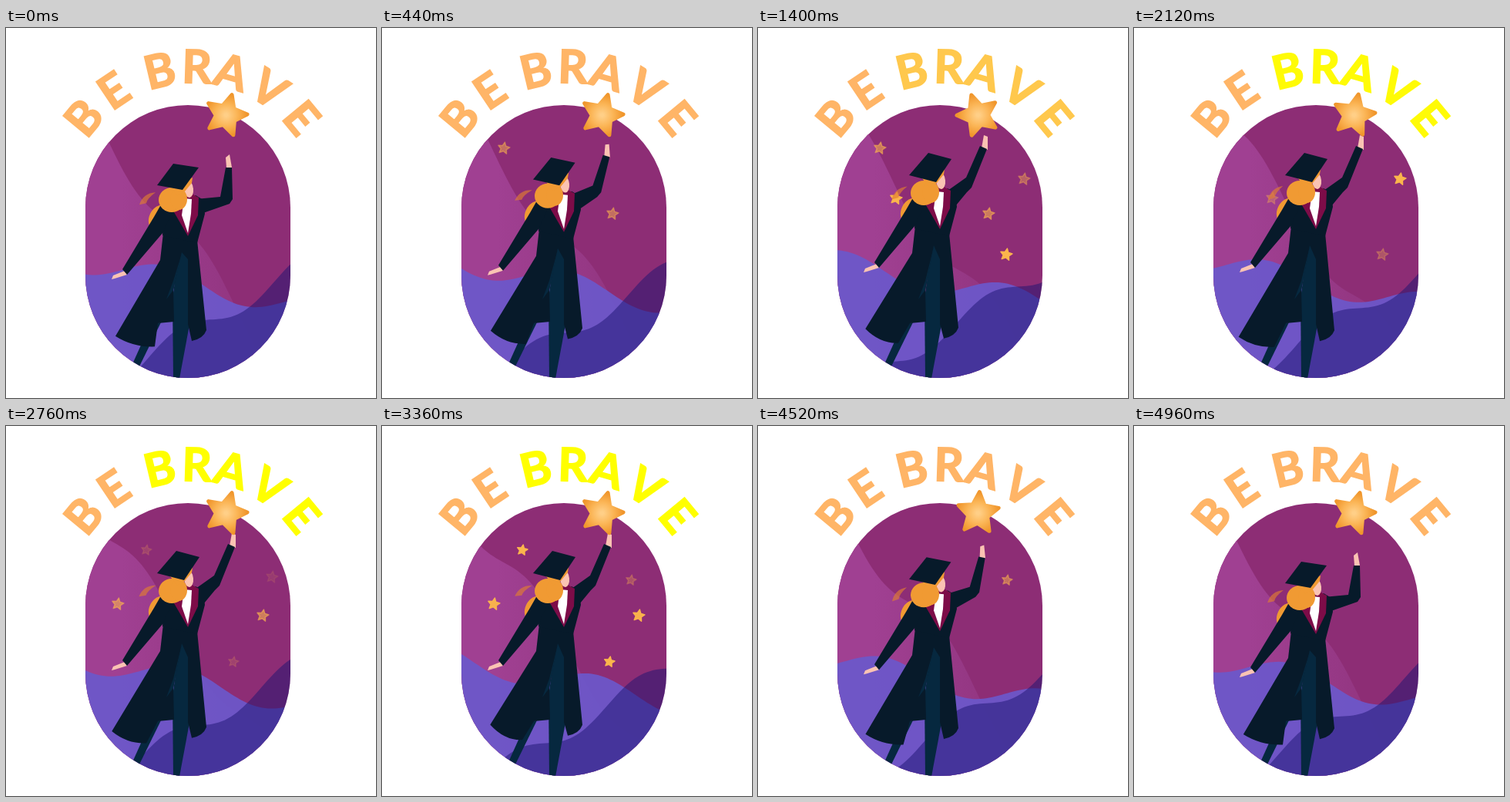
Write an HTML page with a canvas that moves like this. It is 480x480 px and loops after 5000 ms.

```html
<!DOCTYPE html>
<html lang="en">
<head>
<meta charset="utf-8">
<title>Be brave</title>
<style>
html, body { margin: 0; width: 100%; height: 100%; overflow: hidden; background: #fff; }
canvas { display: block; }
</style>
</head>
<body>
<canvas id="stage" width="480" height="480"></canvas>
<script>
const ctx = document.getElementById('stage').getContext('2d');
const LOOP = 5000, CYCLE = LOOP / 2;
const COAT = '#071a2a', TROUSERS = '#06283f', SKIN = '#fac3b3', HAIR = '#f09a33', LAPEL = '#7d0c48';

const clamp = v => Math.max(0, Math.min(1, v));
const lerp = (a, b, k) => a + (b - a) * k;
const ramp = (t, from, to) => clamp((t - from) / (to - from));
const ease = k => k * k * (3 - 2 * k);
const turn = k => Math.cos(k * 2 * Math.PI);
const shift = (pts, dy) => pts.map((v, i) => i % 2 ? v + dy : v);

function poly(color, pts) {
  ctx.fillStyle = color;
  ctx.beginPath();
  for (let i = 0; i < pts.length; i += 2) ctx.lineTo(pts[i], pts[i + 1]);
  ctx.fill();
}

function ellipse(color, x, y, rx, ry, tilt = 0) {
  ctx.fillStyle = color;
  ctx.beginPath();
  ctx.ellipse(x, y, rx, ry, tilt, 0, 7);
  ctx.fill();
}

// Fills everything below the crest.
function wave(color, crest) {
  const pts = [372, 480, 100, 480];
  for (let x = 100; x <= 372; x += 4) pts.push(x, crest(x));
  poly(color, pts);
}

function star(x, y, r, degrees, fill, round) {
  ctx.save();
  ctx.translate(x, y);
  ctx.rotate(degrees * Math.PI / 180);
  ctx.beginPath();
  for (let i = 0; i < 10; i++) {
    const a = i * Math.PI / 5, d = i % 2 ? r * 0.48 : r;
    ctx.lineTo(d * Math.sin(a), -d * Math.cos(a));
  }
  ctx.closePath();
  ctx.fillStyle = ctx.strokeStyle = fill;
  ctx.lineWidth = round;
  ctx.lineJoin = 'round';
  ctx.fill();
  ctx.stroke();
  ctx.restore();
}

// x, y, time of full brightness
const twinkles = [
  [158, 156, 950], [299, 241, 950],
  [179, 221, 1480], [322, 294, 1480], [345, 196, 1980],
  [145, 231, 3200], [333, 246, 3200],
  [182, 161, 3500], [295, 306, 3500], [323, 200, 4020]
];

function drawTwinkles(t) {
  for (const [x, y, peak] of twinkles) {
    ctx.globalAlpha = clamp(1.2 * (1 - Math.abs(t - peak) / 850));
    star(x, y, peak > 3400 ? 7 : 8, 10, '#fbb54c', 1.5);
  }
  ctx.globalAlpha = 1;
}

function drawGown(drop, low, sway) {
  const hemX = 138 + 6 * low - 2.5 * sway, hemY = 394 + 7 * sway;
  const innerX = 182 + 11 * low, innerY = 410.5 + 3.5 * sway;
  const right = 390 + 2.5 * sway;
  ctx.fillStyle = COAT;
  ctx.beginPath();
  ctx.moveTo(205, 248 + drop);
  ctx.lineTo(200, 292 + drop);
  ctx.lineTo(hemX, hemY);
  ctx.quadraticCurveTo(lerp(hemX, innerX, 0.45), innerY + 1, innerX, innerY);
  ctx.lineTo(197, 383);
  ctx.lineTo(218, 381);
  ctx.lineTo(217, 340);
  ctx.lineTo(228, 282 + drop);
  ctx.lineTo(236, 300);
  ctx.lineTo(236, 384);
  ctx.lineTo(241, right + 14);
  ctx.quadraticCurveTo(256, right + 11, 260, right);
  ctx.lineTo(248, 266 + drop);
  ctx.fill();
  poly(TROUSERS, [228, 284 + drop, 217, 328, 208, 352, 217, 340]);
}

function drawTassel(t, y) {
  ctx.save();
  ctx.translate(184, y);
  ctx.rotate(0.12 * Math.sin(t / CYCLE * 2 * Math.PI));
  ctx.fillStyle = 'rgba(225,125,50,.65)';
  ctx.beginPath();
  ctx.moveTo(-11, 8);
  ctx.quadraticCurveTo(-6, -7, 10, -8);
  ctx.quadraticCurveTo(-1, 0, -2, 6);
  ctx.fill();
  ctx.restore();
}

function drawFigure(t) {
  const raise = ease(ramp(t, 0, 800)) * (1 - ease(ramp(t, 3960, 4960)));
  const low = 1 - raise, drop = 9 * low, headDrop = 11 * low;
  const pose = (down, up) => down.map((v, i) => lerp(v, up[i], raise));
  const body = (color, pts) => poly(color, shift(pts, drop));

  // Legs
  poly(TROUSERS, [187, 385, 201, 382, 173, 439, 164, 436]);
  poly(TROUSERS, [227, 275, 237, 290, 238, 385, 225, 455, 217, 455, 216, 350]);
  drawGown(drop, low, turn(t / CYCLE - 0.9));
  drawTassel(t, 214 + drop * 0.8);
  ellipse(HAIR, 198, 237 + drop, 12, 17, 0.45);

  // Torso and arms
  body(COAT, [205, 220, 222, 226, 246, 208, 256, 214, 258, 232, 248, 270, 203, 260]);
  body(SKIN, [154, 306, 139, 312, 137, 317, 141, 316, 157, 311]);
  body(COAT, [207, 219, 200, 222, 192, 236, 151, 304, 157, 311, 204, 256, 216, 228]);
  poly(SKIN, pose([286, 181, 285, 168, 290, 164, 293, 181], [290, 156, 293, 139, 298, 141, 298, 158]));
  poly(COAT, pose(
    [246, 222, 278, 219, 285, 181, 293, 181, 294, 222, 290, 228, 250, 242],
    [246, 211, 270, 194, 288, 153, 297, 157, 277, 207, 271, 213, 252, 236]));

  // Collar
  body(LAPEL, [218, 230, 231, 208, 241, 206, 250, 211, 249, 234, 236, 261]);
  body('#fff', [231, 212, 241, 213, 240, 232, 236, 257, 228, 234]);

  // Head
  ellipse(SKIN, 237, 198 + headDrop, 6, 11, -0.1);
  ellipse(HAIR, 215, 214 + drop, 17, 16);
  ellipse(HAIR, 224, 213 + drop, 11, 14);
  poly(HAIR, shift([213, 195, 242, 183, 241, 190, 232, 201, 222, 207], headDrop));
  poly(COAT, pose(
    [217, 176, 250, 181, 229, 210, 196, 204],
    [221, 162, 251, 170, 231, 200, 196, 191]));
}

function drawScene(t) {
  const cycle = t / CYCLE;
  ctx.save();
  ctx.beginPath();
  ctx.roundRect(103, 100, 266, 354, 133);
  ctx.clip();
  ctx.fillStyle = '#8d2d75';
  ctx.fillRect(100, 98, 272, 358);
  const glow = ctx.createLinearGradient(150, 0, 310, 0);
  glow.addColorStop(0, '#a04092');
  glow.addColorStop(1, '#923580');
  wave(glow, x => 120 + 1.33 * (x - 115) + 21 * turn(t / LOOP - 0.67 - (x - 115) / 170));
  wave('rgba(108,88,203,.93)', x => 303 + 0.2 * (x - 100) + 16 * turn(cycle - (x - 100) / 209));
  wave('rgba(28,20,114,.5)', x => 315 + 0.6 * (372 - x) + 14 * turn(cycle - 0.6 - (372 - x) / 162));
  drawTwinkles(t);
  drawFigure(t);
  ctx.restore();
}

function drawTitle(t) {
  const glow = ramp(t, 1140, 2180) * (1 - ramp(t, 3700, 4520));
  const bright = `rgb(255,${lerp(181, 255, glow)},${lerp(103, 0, glow)})`;
  const angles = [-50.2, -33.8, -13.4, 1.8, 16, 32.8, 50.3];
  ctx.font = '700 60px Lato, sans-serif';
  ctx.textAlign = 'center';
  ctx.lineWidth = 1.8;
  ctx.lineJoin = 'miter';
  [...'BEBRAVE'].forEach((letter, i) => {
    ctx.save();
    ctx.translate(242, 234);
    ctx.rotate(angles[i] * Math.PI / 180);
    ctx.fillStyle = ctx.strokeStyle = i < 2 ? '#ffb567' : bright;
    ctx.fillText(letter, 0, -162.5);
    ctx.strokeText(letter, 0, -162.5);
    ctx.restore();
  });
}

function drawBigStar(t) {
  const phase = t % CYCLE;
  const swing = ramp(phase, 1120, 1560) - ramp(phase, 1560, 2240);
  const gold = ctx.createRadialGradient(0, 0, 2, 0, 0, 27);
  gold.addColorStop(0, '#ffcf87');
  gold.addColorStop(0.5, '#fbb556');
  gold.addColorStop(1, '#f0962c');
  star(285.5, 113, 27.5, lerp(16, -33, ease(swing)), gold, 5);
}

function frame(now) {
  const t = now % LOOP;
  ctx.clearRect(0, 0, 480, 480);
  drawScene(t);
  drawTitle(t);
  drawBigStar(t);
  requestAnimationFrame(frame);
}
requestAnimationFrame(frame);
</script>
</body>
</html>
```
